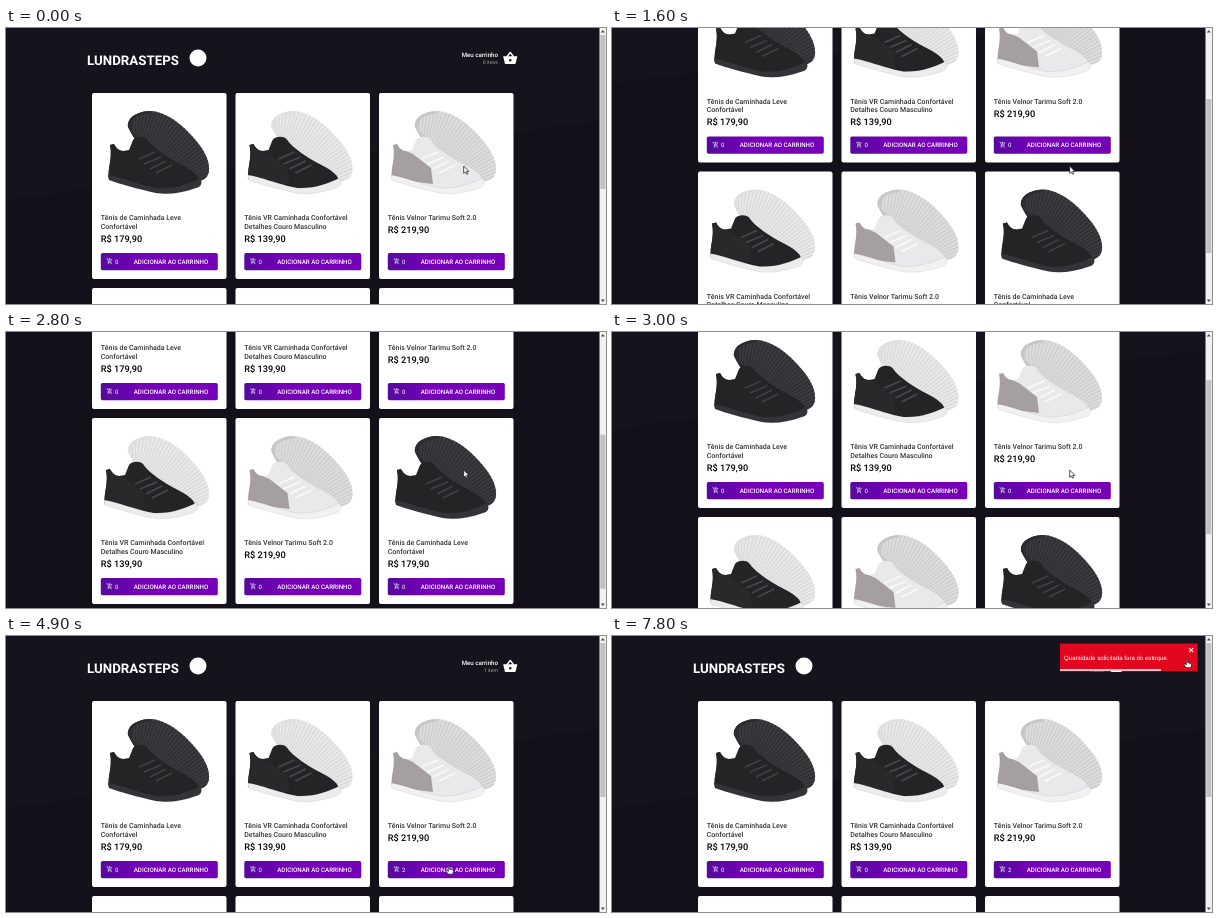
An HTML page that plays this animation: 600x276 px, repeating every 8 s.

```html
<!DOCTYPE html>
<html lang="pt-BR">
<head>
<meta charset="utf-8">
<title>Loja</title>
<style>
  html, body { margin: 0; width: 100%; height: 100%; overflow: hidden; background: #16131c; }
  svg { display: block; width: 600px; height: 276px; }
  text { font-family: Roboto, sans-serif; font-weight: 500; text-rendering: geometricPrecision; white-space: pre; }
  .bold { font-weight: 700; }
  .light { font-weight: 400; }
</style>
</head>
<body>
<svg id="stage" viewBox="0 0 600 276">
  <defs>
    <linearGradient id="purple">
      <stop offset="0" stop-color="#560a9c"/>
      <stop offset=".19" stop-color="#6404ab"/>
      <stop offset=".32" stop-color="#7600b8"/>
    </linearGradient>
    <path id="back" d="M36 34C35 24 46 18 60 18C78 20 95 36 106 50C114 60 118 70 117 78C116 87 108 89 98 89C78 82 48 60 36 34Z"/>
    <clipPath id="backClip"><use href="#back"/></clipPath>
    <g id="cart" fill="none" stroke="#fff" stroke-width="2">
      <path d="M1 3h3l4 9h8l4-8M8 12l-2 4h13M12 1v8M8 5h8"/>
      <circle cx="7" cy="20" r="1"/><circle cx="17" cy="20" r="1"/>
    </g>
  </defs>
  <g id="page">
    <path fill="#131019" d="M0 172L600 92V500H0Z"/>
    <text class="bold" x="81" y="37" font-size="13.3" fill="#fff">LUNDRASTEPS</text>
    <circle cx="192" cy="30" r="8.5" fill="#fff"/>
    <text x="492" y="29" font-size="6.15" fill="#fff" text-anchor="end">Meu carrinho</text>
    <text id="items" class="light" x="492" y="36" font-size="5.16" fill="#999" text-anchor="end"></text>
    <g transform="translate(496.5 22.5) scale(.645)" fill="#fff">
      <path d="M6.5 10L12 3.2L17.5 10" fill="none" stroke="#fff" stroke-width="2.2" stroke-linejoin="round"/>
      <path fill-rule="evenodd" d="M1 9H23L20.3 20Q20 21 18.5 21H5.500Q4 21 3.700 20ZM12 13a2 2 0 1 0 .01 0Z"/>
    </g>
    <g id="cards"></g>
  </g>
  <g id="toast">
    <rect x="448" y="7.500" width="137.600" height="27.600" rx=".5" fill="#e2061f"/>
    <text class="light" x="452" y="24" font-size="6.1" fill="#fff" style="font-family: 'Liberation Sans', sans-serif">Quantidade solicitada fora do estoque.</text>
    <path d="M577.200 12.200l4 4m0-4l-4 4" stroke="#fff" stroke-width="1.200"/>
    <rect id="bar" x="448" y="33" height="2.150" fill="#fff" opacity=".75"/>
  </g>
  <rect x="593.500" width="6.500" height="276" fill="#f1f1f1"/>
  <path d="M594.800 4.500h4l-2-2.500zM594.800 271.500h4l-2 2.500z" fill="#505050"/>
  <rect id="thumb" x="594.300" width="5" height="154" fill="#c1c1c1"/>
  <path id="arrow" d="M0 0V7.400L1.700 5.900L2.900 8.300L4.100 7.800L2.900 5.400H5.200Z" fill="#fff" stroke="#111" stroke-width=".7"/>
  <path id="hand" d="M-.7 .3Q0 -.5 .7 .3V3.200L4 4Q4.700 4.400 4.500 5.500L3.700 8.200H-.8L-3 5.200Q-2.800 4 -1.700 4.600L-.7 5.400Z" fill="#fff" stroke="#111" stroke-width=".7"/>
</svg>
<script>
const $ = id => document.getElementById(id);

const walk = {
  lines: ['Tênis de Caminhada Leve', 'Confortável'], price: '179,90', shift: 0,
  upper: '#242427', heel: '#242427', sole: '#343438', back: '#3b3b3f', side: '#2c2c2f', tread: '#2b2b2e', lace: '#404044'
};
const comfort = {
  lines: ['Tênis VR Caminhada Confortável', 'Detalhes Couro Masculino'], price: '139,90', shift: -4,
  upper: '#242427', heel: '#29292c', sole: '#ececec', back: '#e8e8e8', side: '#e0e0e0', tread: '#d6d6d6', lace: '#48484c'
};
const lite = {
  lines: ['Tênis Velnor Tarimu Soft 2.0'], price: '219,90', shift: -4,
  upper: '#e9e9eb', heel: '#a69fa2', sole: '#f1f1f1', back: '#dcdcdd', side: '#c9c5c7', tread: '#cacacb', lace: '#fafafa'
};
const products = [walk, comfort, lite, comfort, lite, walk];

const shoe = p => `
  <use href="#back" fill="${p.back}"/>
  <g clip-path="url(#backClip)" fill="none">
    <path d="M40 28C72 28 102 56 112 88" stroke="${p.tread}" stroke-width="46" stroke-dasharray="1 2.200"/>
    <path d="M58 18Q32 20 38 40L98 89" stroke="${p.side}" stroke-width="5"/>
  </g>
  <g transform="translate(${p.shift} 0)">
    <path fill="${p.upper}" d="M18 52L22 51C24 55 27 58 31 58L37 57L41 47C44 43 52 43 55 46C61 55 76 65 90 72C99 77 106 81 107 87L106 92L70 98L17 86C15 76 21 66 18 52Z"/>
    <path fill="${p.heel}" d="M18 52L22 51C24 55 27 58 31 58L38 61L56 75L58 91L17 86C15 76 21 66 18 52Z"/>
    <path fill="none" stroke="${p.lace}" stroke-width="1.600" d="M47 66l16-7M52 71l17-7M58 76l16-8M64 80l16-8"/>
    <path fill="${p.sole}" stroke="#0002" stroke-width=".5" d="M16 82C30 84 48 92 66 95C82 96 98 90 108 85C111 90 109 94 104 95C90 100 76 102 64 100C46 96 28 91 17 87Z"/>
  </g>`;

const card = (p, i) => `
  <g transform="translate(${86 + i % 3 * 143.5} ${65 + (i > 2) * 195})">
    <rect width="134.500" height="186" rx="2" fill="#fff"/>
    ${shoe(p)}
    ${p.lines.map((s, n) => `<text x="8.800" y="${127 + n * 8.6}" font-size="7" fill="#333">${s}</text>`).join('')}
    <text x="8.800" y="${140 + (p.lines.length - 1) * 8.6}" font-size="9.2" fill="#000">R$ ${p.price}</text>
    <rect x="8.800" y="160" width="117" height="17.200" rx="1.700" fill="url(#purple)"/>
    <use href="#cart" transform="translate(14.200 164.800) scale(.287)"/>
    <text class="count light" x="23" y="170.600" font-size="6.02" fill="#fff">0</text>
    <text x="79" y="170.600" font-size="6.2" fill="#fff" text-anchor="middle">ADICIONAR AO CARRINHO</text>
  </g>`;
$('cards').innerHTML = products.map(card).join('');
const count = document.querySelectorAll('.count')[2];

// Keys are [time, ...values], joined by straight lines.
const scrollKeys = [[1300, 0], [1400, 65], [1800, 168], [1900, 191], [2700, 191], [2800, 174], [2900, 125], [3000, 75], [3100, 28], [3200, 0]];
const pointerKeys = [
  [3600, 457.7, 138], [4300, 443, 230], [5200, 443, 230], [5500, 397, 244], [5800, 386, 249], [6200, 400, 246],
  [6500, 443, 230], [6900, 443, 230], [7600, 576, 23.8], [7700, 576, 23.8], [7800, 575, 23.5]
];
const toastKeys = [[0, 1290], [0.6, -11], [0.75, 4.3], [0.9, -2], [1, 0]];
const easeOut = k => 1 - (1 - k) ** 3;

function at(keys, t, ease = k => k) {
  const n = keys.findIndex(key => key[0] > t);
  if (n < 1) return keys.at(n).slice(1);
  const [a, b] = [keys[n - 1], keys[n]];
  const k = ease((t - a[0]) / (b[0] - a[0]));
  return a.slice(1).map((v, i) => v + (b[i + 1] - v) * k);
}

const move = (id, x, y) => $(id).setAttribute('transform', `translate(${x} ${y})`);
const show = (id, on) => $(id).setAttribute('visibility', on ? 'visible' : 'hidden');

function draw(t) {
  const [scroll] = at(scrollKeys, t);
  move('page', 0, -scroll);
  $('thumb').setAttribute('y', 7 + scroll * 0.55);

  count.textContent = t < 4500 ? 0 : t < 4900 ? 1 : 2;
  $('items').textContent = t < 4500 ? '0 itens' : '1 item';

  const toastOn = t > 6800;
  show('toast', toastOn);
  move('toast', at(toastKeys, (t - 6800) / 700, easeOut)[0], 0);
  $('bar').setAttribute('width', 137.6 * (1 - Math.max(0, Math.min(t, 7600) - 6800) / 3000));

  const [x, y] = at(pointerKeys, t);
  const onButton = x > 382 && x < 499 && y > 225 && y < 242;
  const onToast = toastOn && x > 448 && y < 35;
  show('arrow', !onButton && !onToast);
  show('hand', onButton || onToast);
  move('arrow', x, y);
  move('hand', x, y);
}

const start = performance.now();
function tick() {
  draw(Math.floor((performance.now() - start) % 8000 / 100) * 100);
  requestAnimationFrame(tick);
}
tick();
</script>
</body>
</html>
```
